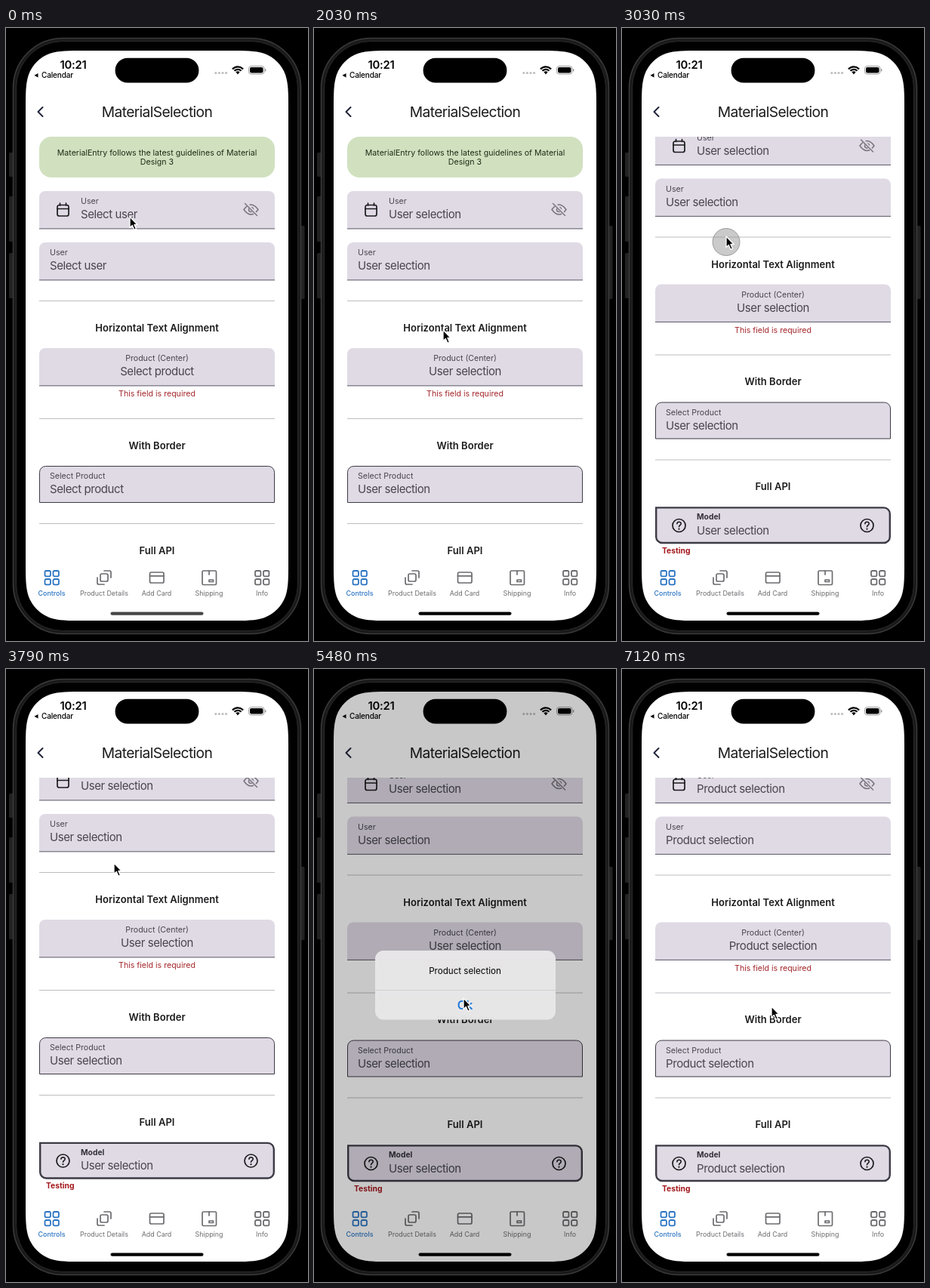
These frames come from a looping animation (400 by 812 pixels, 7.15 s). An HTML page with a canvas:

```html
<!DOCTYPE html>
<html lang="en">
<head>
<meta charset="utf-8">
<title>MaterialSelection</title>
<style>
html, body { margin: 0; width: 100%; height: 100%; overflow: hidden; background: #000; }
canvas { display: block; width: 400px; height: 812px; }
</style>
</head>
<body>
<canvas id="stage"></canvas>
<script>
const LOOP = 7150, W = 400, H = 812, MAX_SCROLL = 88.5;
const canvas = document.getElementById('stage');
const ctx = canvas.getContext('2d');
const dpr = window.devicePixelRatio || 1;
canvas.width = W * dpr;
canvas.height = H * dpr;

const INK = '#1b1b1d', SOFT = '#48454e', GREY = '#6c6c70', BLUE = '#2b74c2', FILL = '#e0dae5';

const clamp = v => Math.max(0, Math.min(1, v));
const ramp = (t, a, b) => clamp((t - a) / (b - a));
const ease = p => p * p * (3 - 2 * p);

// Smooth interpolation over [time, ...values] keys.
function track(keys, t) {
  let i = 1;
  while (i < keys.length - 1 && t > keys[i][0]) i++;
  const a = keys[i - 1], b = keys[i], p = ease(ramp(t, a[0], b[0]));
  return a.slice(1).map((v, k) => v + (b[k + 1] - v) * p);
}

const cursorKeys = [
  [0, 164, 250], [850, 164, 250], [1180, 188, 438], [1600, 188, 438],
  [2030, 171, 400], [2450, 140, 367], [2650, 140, 367], [3030, 138, 276],
  [3500, 143, 257], [4050, 143, 257], [4550, 196, 363], [4980, 196, 363],
  [5350, 198, 436], [5800, 198, 436], [6300, 198, 447], [LOOP, 198, 447]
];
const scrollKeys = [[0, 0], [2660, 0], [3030, 84.5], [3450, 97], [3600, 97], [3790, 92], [4100, MAX_SCROLL], [LOOP, MAX_SCROLL]];
const presses = [[380, 480], [1330, 1430], [2520, 3620], [4660, 4760], [5610, 5710]];
const dialogs = [
  { text: 'User selection', show: 600, hide: 1480 },
  { text: 'Product selection', show: 4880, hide: 5760 }
];

function text(str, x, y, size, { color = INK, weight = 400, align = 'left', gap = 0 } = {}) {
  ctx.font = `${weight} ${size}px Inter, "Open Sans", sans-serif`;
  ctx.letterSpacing = gap + 'px';
  ctx.textAlign = align;
  ctx.textBaseline = 'alphabetic';
  ctx.fillStyle = color;
  ctx.fillText(str, x, y + size * 0.364);
}

function box(x, y, w, h, r, fill, stroke, width = 1) {
  ctx.beginPath();
  ctx.roundRect(x, y, w, h, r);
  if (fill) { ctx.fillStyle = fill; ctx.fill(); }
  if (stroke) { ctx.strokeStyle = stroke; ctx.lineWidth = width; ctx.stroke(); }
}

// Rectangle with continuous-curvature corners.
function smoothRect(x, y, w, h, r) {
  const corners = [[x, y], [x + w, y], [x + w, y + h], [x, y + h]];
  let dx = 0, dy = -1;
  ctx.beginPath();
  for (const [cx, cy] of corners) {
    const ox = -dy, oy = dx;
    const p = (a, b) => [cx + r * (ox * a - dx * b), cy + r * (oy * a - dy * b)];
    ctx.lineTo(...p(0, 1.529));
    ctx.bezierCurveTo(...p(0, 1.088), ...p(0, 0.868), ...p(0.075, 0.631));
    ctx.bezierCurveTo(...p(0.169, 0.373), ...p(0.373, 0.169), ...p(0.631, 0.075));
    ctx.bezierCurveTo(...p(0.868, 0), ...p(1.088, 0), ...p(1.529, 0));
    [dx, dy] = [ox, oy];
  }
  ctx.closePath();
}

function path(d, color, width = 1.6, fill) {
  const p = new Path2D(d);
  if (fill) { ctx.fillStyle = fill; ctx.fill(p); }
  if (!color) return;
  ctx.strokeStyle = color;
  ctx.lineWidth = width;
  ctx.lineCap = ctx.lineJoin = 'round';
  ctx.stroke(p);
}

function at(x, y, draw) {
  ctx.save();
  ctx.translate(x, y);
  draw();
  ctx.restore();
}

function disc(x, y, r, fill, stroke, width) {
  box(x - r, y - r, 2 * r, 2 * r, r, fill, stroke, width);
}

function rule(y, color = '#bdbcc1') {
  ctx.fillStyle = color;
  ctx.fillRect(44, y, 312, 1);
}

const heading = (str, y) => text(str, 200, y, 13, { weight: 600, align: 'center', gap: 0.03 });

function calendarIcon(x, y) {
  at(x, y, () => {
    box(-7.5, -6.5, 15, 14.5, 2.5, null, INK, 1.7);
    path('M-7.5 -1.5H7.5M-4 -9V-6M4 -9V-6', INK, 1.7);
  });
}

function eyeOffIcon(x, y) {
  at(x, y, () => {
    path('M-9.5 0Q0 -13 9.5 0Q0 13 -9.5 0Z', '#77747c', 1.5);
    disc(0, 0, 3, null, '#77747c', 1.5);
    path('M-6 -8L8 8', FILL, 3.6);
    path('M-8 -8L8 8', '#77747c', 1.5);
  });
}

function helpIcon(x, y) {
  disc(x, y, 8.5, null, INK, 1.7);
  at(x, y, () => {
    path('M-2.6 -2.2C-2.4 -5.6 2.8 -5.4 2.7 -2.2C2.6 -.3 0 -.2 0 1.8', INK, 1.6);
    disc(0, 4.7, 1.1, INK);
  });
}

function field(y, label, value, { x = 58, center = false, border = 0, corners = [8, 8, 0, 0], bold = false } = {}) {
  const align = center ? 'center' : 'left';
  if (border) {
    const h = border / 2;
    box(44 + h, y + h, 312 - border, 49 - border, corners, FILL, '#3d3b45', border);
  } else {
    box(44, y, 312, 50, corners, FILL);
    rule(y + 49.4, '#5a5766');
  }
  text(label, x, y + 13.5, bold ? 10.3 : 10.6, { color: bold ? '#333039' : SOFT, weight: bold ? 700 : 400, align });
  text(value, x, y + 31, 15, { color: SOFT, align, gap: -0.42 });
}

function content(scroll, user, product) {
  ctx.save();
  ctx.beginPath();
  ctx.rect(26, 144, 348, 562);
  ctx.clip();
  ctx.translate(0, -scroll);

  box(44, 144, 312, 54, 16, '#d1e1c0');
  const note = { color: '#1d2b14', align: 'center' };
  text('MaterialEntry follows the latest guidelines of Material', 200, 165, 10.6, note);
  text('Design 3', 200, 177.5, 10.6, note);

  field(216, 'User', user, { x: 99 });
  calendarIcon(75.5, 241);
  eyeOffIcon(324.5, 240.5);
  field(284, 'User', user);
  rule(361);
  heading('Horizontal Text Alignment', 397.5);
  field(424, 'Product (Center)', product, { x: 200, center: true });
  text('This field is required', 200, 484.5, 10.6, { color: '#a3262a', align: 'center' });
  rule(517);
  heading('With Border', 553);
  field(580, 'Select Product', product, { border: 1 });
  rule(656);
  heading('Full API', 692);
  field(718.7, 'Model', product, { x: 99, border: 2.4, corners: [0, 8, 8, 8], bold: true });
  helpIcon(75.5, 743.5);
  helpIcon(324.5, 743.5);
  text('Testing', 53, 776.5, 10.3, { color: '#a3171c', weight: 700 });
  ctx.restore();
}

function gridIcon(color) {
  for (const x of [-9, 2]) for (const y of [-9, 2]) box(x, y, 7.4, 7.4, 1.8, null, color, 1.8);
}

const tabs = [
  ['Controls', 60.5, gridIcon],
  ['Product Details', 130, c => {
    box(-5, -5, 10, 10, 2, null, c, 1.7);
    path('M0 -9H7Q9 -9 9 -7V0M0 9H-7Q-9 9 -9 7V0', c, 1.7);
  }],
  ['Add Card', 199.5, c => {
    box(-9, -7, 18.5, 14, 2, null, c, 1.7);
    path('M-9 -2.2H9.5', c, 1.7);
  }],
  ['Shipping', 269, c => {
    box(-9, -9, 18.5, 18.5, 1.5, null, c, 1.7);
    path('M0 -9V-4M0 3H5.5V5.5H0Z', c, 1.7);
  }],
  ['Info', 339, gridIcon]
];

function tabBar() {
  tabs.forEach(([name, x, icon], i) => {
    const color = i ? GREY : BLUE;
    at(x, 728, () => icon(color));
    text(name, x, 748.5, 8.9, { color, weight: i ? 400 : 500, align: 'center' });
  });
}

function statusBar() {
  text('10:21', 89, 49, 14.8, { weight: 600, align: 'center', color: '#000', gap: -0.2 });
  path('M37.5 62.8L42.5 60V65.6Z', null, 0, '#000');
  text('Calendar', 47, 62.7, 10, { weight: 500, color: '#000', gap: -0.15 });
  for (let i = 0; i < 4; i++) disc(277.8 + i * 4.6, 59.5, 1.5, '#bcbcbe');
  at(307, 61, () => {
    ctx.lineCap = 'butt';
    ctx.strokeStyle = '#000';
    ctx.lineWidth = 2.3;
    for (const r of [9.6, 6.2]) {
      ctx.beginPath();
      ctx.arc(0, 0, r, -Math.PI * 0.76, -Math.PI * 0.24);
      ctx.stroke();
    }
    path('M0 .5L-2.6 -2.7Q0 -4.6 2.6 -2.7Z', null, 0, '#000');
  });
  box(321.5, 50.5, 20.5, 10.5, 3.3, null, '#9b9b9d', 1);
  box(323, 52, 17.5, 7.5, 2, '#000');
  box(343, 54, 1.4, 3.6, 0.7, '#9b9b9d');
}

function phone() {
  ctx.fillStyle = '#000';
  ctx.fillRect(0, 0, W, H);
  for (const [y, h] of [[165, 32], [223, 60], [298, 60]]) box(4, y, 7, h, 1.5, '#222');
  box(389, 262, 6.5, 97, 1.5, '#222');
  box(9.5, 13.5, 381, 789, 66, '#1a1a1a', '#3b3b3b', 1.5);
  box(13.5, 17.5, 373, 781, 62, '#000', '#2b2b2b', 1);
}

function dialog(t, d) {
  const opacity = ease(ramp(t, d.show, d.show + 250)) * (1 - ease(ramp(t, d.hide, d.hide + 250)));
  if (!opacity) return;
  ctx.save();
  ctx.globalAlpha = opacity;
  ctx.fillStyle = 'rgba(0,0,0,.215)';
  ctx.fillRect(26, 30, 348, 755);
  const scale = 1.15 - 0.15 * ease(ramp(t, d.show, d.show + 250));
  ctx.translate(200, 418.5);
  ctx.scale(scale, scale);
  ctx.translate(-200, -418.5);
  box(81, 373, 239, 91.5, 11, 'rgba(233,232,233,.97)');
  ctx.fillStyle = '#cfced0';
  ctx.fillRect(81, 425, 239, 1);
  text(d.text, 200, 400, 11.6, { align: 'center', color: '#000' });
  text('Ok', 200, 445.5, 15.5, { align: 'center', color: '#1b78dc', weight: 600 });
  ctx.restore();
}

function pointer(t) {
  const [x, y] = track(cursorKeys, t);
  if (presses.some(([a, b]) => t >= a && t < b)) {
    disc(x, y + 7.5, 18, 'rgba(150,150,150,.5)', 'rgba(110,110,110,.6)', 1);
  }
  at(x, y, () => path('M0 0V14.5L3.3 11.5L5.8 17.3L8.4 16.2L5.9 10.5H10.2Z', '#fff', 1.3, '#000'));
}

function draw(t) {
  ctx.setTransform(dpr, 0, 0, dpr, 0, 0);
  phone();
  ctx.save();
  smoothRect(26, 30, 348, 755, 51);
  ctx.clip();
  ctx.fillStyle = '#fff';
  ctx.fillRect(26, 30, 348, 755);

  const early = t < 1530, late = t >= 5810;
  const picked = late ? 'Product selection' : 'User selection';
  content(track(scrollKeys, t)[0], early ? 'Select user' : picked, early ? 'Select product' : picked);
  statusBar();
  path('M48.5 105L42.5 111L48.5 117', '#20243a', 2);
  text('MaterialSelection', 200, 111, 19.2, { align: 'center', gap: -0.62 });
  tabBar();
  const shade = Math.round(70 * (1 - ramp(t, 0, 600)));
  box(138.5, 773.4, 123, 4.4, 2.2, `rgb(${shade},${shade},${shade})`);
  dialogs.forEach(d => dialog(t, d));
  ctx.restore();
  box(144.6, 39.8, 110.8, 32.8, 16.4, '#000');
  pointer(t);
}

const start = performance.now();
function tick() {
  draw((performance.now() - start) % LOOP);
  requestAnimationFrame(tick);
}
tick();
</script>
</body>
</html>
```
